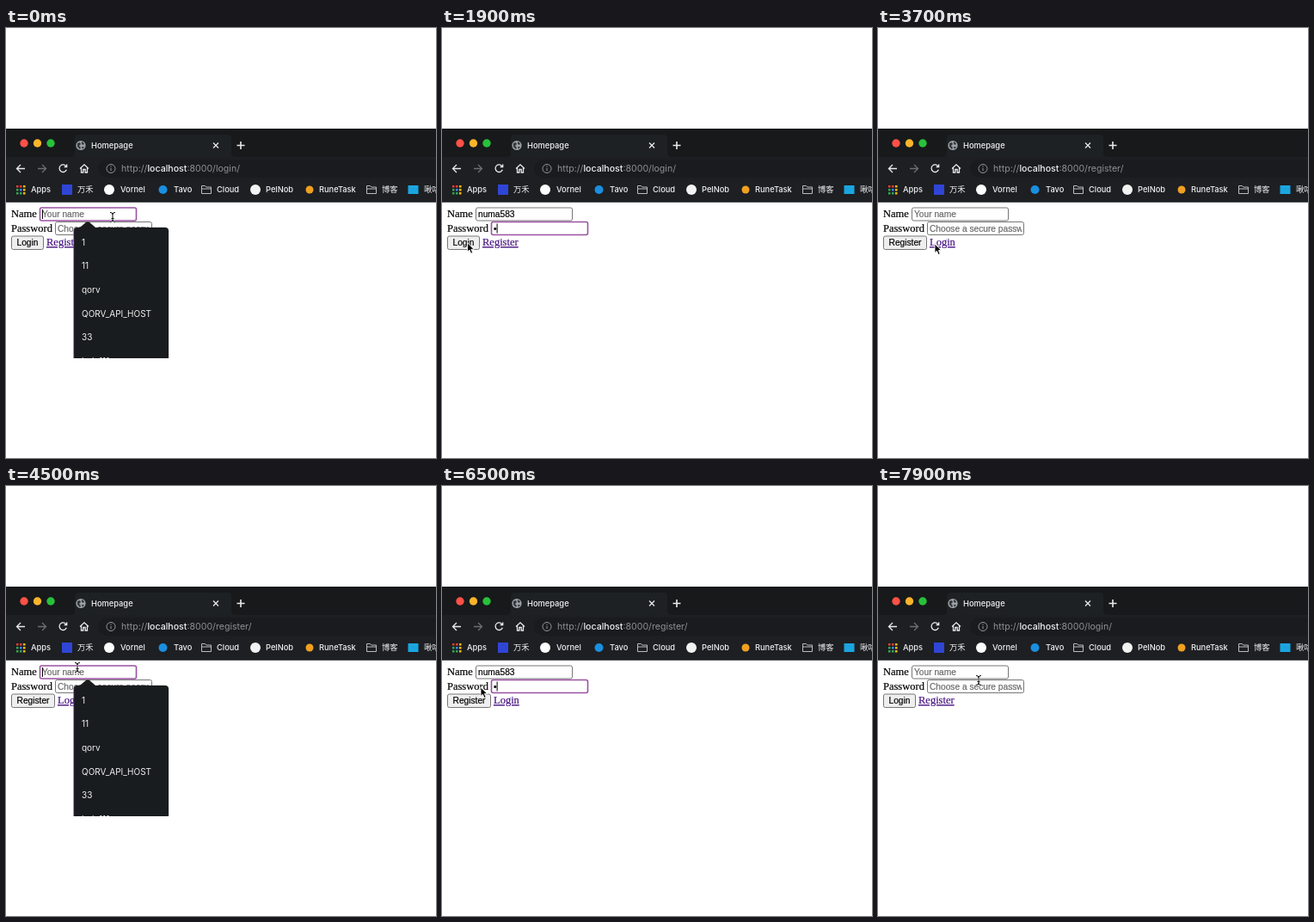
An HTML page that plays this animation: 500 px wide and 500 px high, repeating every 8 s.

```html
<!DOCTYPE html>
<html lang="en">
<head>
<meta charset="utf-8">
<title>Login form</title>
<style>
  html, body { margin: 0; width: 100%; height: 100%; overflow: hidden; background: #fff; }
  svg { display: block; }
  text { white-space: pre; }
  .ui { font: 500 9.3px Inter, "Noto Sans CJK SC", "Noto Sans CJK", sans-serif; fill: #f0f1f2; }
  .url { font: 400 10.6px Inter, sans-serif; fill: #8d9196; }
  .item { font: 400 10px Inter, sans-serif; fill: #f0f0f0; }
  .page { font: 12.5px "Liberation Serif", serif; stroke: #000; stroke-width: .2; }
  .link { fill: #451080; stroke: #451080; text-decoration: underline; }
  .field { font: 10.2px "Liberation Sans", sans-serif; stroke: currentColor; stroke-width: .2; }
  .line { fill: none; stroke: #e8eaec; stroke-width: 1.3; }
</style>
</head>
<body>
<svg id="stage" width="100%" height="100%" viewBox="0 0 500 500">
  <g id="chrome"></g>
  <g id="view"></g>
</svg>
<script>
const LOOP = 8000, STEP = 100, USER = 'numa583';

const text = (x, y, s, cls, extra = '') => `<text x="${x}" y="${y}" class="${cls}" ${extra}>${s}</text>`;
const rect = (x, y, w, h, fill, extra = '') =>
  `<rect x="${x}" y="${y}" width="${w}" height="${h}" fill="${fill}" ${extra}/>`;
const dot = (x, y, r, fill) => `<circle cx="${x}" cy="${y}" r="${r}" fill="${fill}"/>`;
const line = (d, extra = '') => `<path class="line" d="${d}" ${extra}/>`;
const folder = x => line(`M${x - 5.5} 183.5h4l1.3 1.5h5.7v7.5h-11zM${x - 5.5} 187h11`, 'style="stroke:#b9bdc2;stroke-width:1"');

function drawChrome() {
  const lights = ['#ff5147', '#fdb42a', '#28c13a'].map((c, i) => dot(21 + 15.5 * i, 134, 4.7, c));
  const appColors = ['#ea4335', '#ea4335', '#fbbc05', '#34a853', '#4285f4', '#fbbc05', '#34a853', '#34a853', '#fbbc05'];
  const apps = appColors.map((c, i) => rect(12 + i % 3 * 4, 183 + Math.floor(i / 3) * 4, 2.5, 2.5, c));
  const labels = [[29, 'Apps'], [83, '万禾'], [133, 'Vornel'], [195, 'Tavo'], [245, 'Cloud'],
    [302, 'PelNob'], [364, 'RuneTask'], [437, '博客'], [486, '啾咕']];
  return [
    rect(0, 117, 500, 85.5, '#17191b'),
    rect(0, 150, 500, 52.5, '#1d1f22'),
    '<path d="M75 150q5 0 5-5v-16q0-5 5-5h172q5 0 5 5v16q0 5 5 5z" fill="#1e2124"/>',
    rect(107, 153, 400, 21, '#191b1e', 'rx="10.5"'),
    ...lights,
    dot(87, 136.5, 5.6, '#9ba1a6'),
    '<path d="M83 134l3-1 1 2-2 2 2 2-1 2-3-3zM88 132l3 2-1 2-2-1zM88 138l3 0-2 3z" fill="#34383c"/>',
    text(99, 139.8, 'Homepage', 'ui'),
    line('M241 133.5l6 6m0-6l-6 6'),
    line('M268.5 136.5h9m-4.5-4.5v9', 'style="stroke-width:1.6"'),
    line('M22 163.5h-9.5m4.5-4.5l-4.5 4.5 4.5 4.5'),
    line('M70 160.8a4.3 4.3 0 1 0 .4 4M70.7 158.5v3h-3'),
    line('M86 163.5l5-4.7 5 4.7M87.5 162.5v5.5h2.3v-3.5h2.4v3.5h2.3v-5.5'),
    line('M127 163.5a5 5 0 1 1-10 0a5 5 0 1 1 10 0M122 162.8v3.4M122 160.4v1.2', 'style="stroke:#94989d;stroke-width:1"'),
    ...apps,
    rect(65, 182, 12, 12, '#2f45d6'),
    dot(120, 188, 6, '#fff'),
    dot(182.5, 188, 5, '#1a8fe0'),
    folder(233),
    dot(290, 188, 6, '#f2f2f2'),
    dot(353, 188, 4.5, '#f0a020'),
    folder(425),
    rect(467.5, 183, 12, 10, '#1ba5e0'),
    ...labels.map(([x, s]) => text(x, 191.3, s, 'ui'))
  ].join('');
}

function input(x, y, value, hint, focused, caret) {
  const shown = value || hint;
  const color = value ? '#000' : '#686868';
  const ring = focused ? 'stroke="#9a52a2" stroke-width="1.6"' : 'stroke="#767676"';
  const caretX = x + 3 + (value === '•' ? 3.6 : value.length * 6.05);
  return rect(x + .5, y + .5, 112, 15, '#fff', `rx="2" ${ring}`) +
    `<svg x="${x + 3}" y="${y}" width="107" height="16">` +
    text(0, 11.6, shown, 'field', `fill="${color}" color="${color}"`) + '</svg>' +
    (focused && caret ? rect(caretX, y + 2.5, 1, 11, '#000') : '');
}

function dropdown() {
  const items = ['1', '11', 'qorv', 'QORV_API_HOST', '33', 'belo111'];
  return '<svg y="220" width="500" height="164" viewBox="0 220 500 164">' +
    '<path d="M83 232h3l7-6q2-1 4 0l7 6h81q4 0 4 4v160H79V236q0-4 4-4z" fill="#191c1e" stroke="#000" stroke-opacity=".2"/>' +
    rect(78.5, 235, .7, 150, '#7b3a86') +
    items.map((s, i) => text(88, 252.8 + 27.6 * i, s, 'item')).join('') + '</svg>';
}

// Pointer runs: each is a shape followed by [time, x, y] points.
const runs = [
  ['beam', [0, 124, 220], [300, 124, 220]],
  ['arrow', [1500, 100, 236], [1800, 30, 250], [2200, 28, 249], [2700, 22, 171], [3000, 22, 171], [3300, 62, 244]],
  ['hand', [3300, 62, 246], [3400, 66, 251], [3700, 66, 251]],
  ['arrow', [3700, 66, 251], [4000, 80, 226]],
  ['beam', [4000, 80, 222], [4200, 83, 211], [4700, 83, 211]],
  ['beam', [5200, 83, 214], [5400, 74, 228], [5800, 74, 228]],
  ['arrow', [6200, 66, 230], [6500, 45, 234], [6800, 35, 250], [7200, 36, 258], [7500, 88, 306], [7800, 112, 244]],
  ['beam', [7800, 115, 234], [7900, 117, 226], [8000, 117, 226]]
];
const beam = 'M-3-5.5q3 0 3 2 0-2 3-2M0-4v8M-3 5.5q3 0 3-2 0 2 3 2M-1.5 1.5h3';
const shapes = {
  beam: `<path d="${beam}" fill="none" stroke="#fff" stroke-width="2.2"/><path d="${beam}" fill="none" stroke="#000"/>`,
  arrow: '<path d="M0 0v10.5l2.4-2.2 1.8 4.2 2-.9-1.8-4h3.3z" fill="#000" stroke="#fff" stroke-width=".9"/>',
  hand: '<path d="M-1 0q1.5-1 2 .5v4l4 1q2 .5 1.5 3l-1 4.5h-5l-4-5q0-2 2.5-.5z" fill="#000" stroke="#fff" stroke-width=".9"/>'
};

function pointer(t) {
  const run = runs.find(([, ...p]) => t >= p[0][0] && t < p[p.length - 1][0]);
  if (!run) return '';
  const [shape, ...pts] = run;
  const i = pts.findIndex(p => p[0] > t);
  const [a, b] = [pts[i - 1], pts[i]];
  const k = (t - a[0]) / (b[0] - a[0]);
  const at = n => a[n] + (b[n] - a[n]) * k;
  return `<g transform="translate(${at(1)} ${at(2)})">${shapes[shape]}</g>`;
}

const within = (t, a, b) => t >= a && t < b;
const typed = (t, start) => USER.slice(0, Math.max(0, Math.floor((t - start) / 100) + 1));

function drawView(t) {
  const register = within(t, 3500, 7000);
  const name = t < 3500 ? typed(t, 300) : register ? typed(t, 4600) : '';
  const pass = within(t, 1600, 2400) || within(t, 5800, 7000) ? '•' : '';
  const nameFocus = t < 1300 || within(t, 4200, 5400);
  const passFocus = within(t, 1300, 2100) || within(t, 5400, 6900);
  const list = t < 500 || within(t, 4300, 4800);
  const caret = (t + 500) % 1000 <= 500;
  const forward = within(t, 2500, 3500);
  const [action, other, width] = register ? ['Register', 'Login', 51] : ['Login', 'Register', 38];
  return [
    line('M37 163.5h9.5m-4.5-4.5l4.5 4.5-4.5 4.5', forward ? '' : 'style="stroke:#6b6f74"'),
    text(134, 167.3, `http://<tspan fill="#f1f3f4" font-weight="500">localhost</tspan>:8000/${action.toLowerCase()}/`, 'url'),
    text(6, 220, 'Name', 'page'),
    input(39, 208.5, name, 'Your name', nameFocus, caret),
    text(6, 236.7, 'Password', 'page'),
    input(57, 225, pass, 'Choose a secure password', passFocus, caret),
    rect(6.5, 242, width - 1, 15.5, '#efefef', 'rx="2" stroke="#767676"'),
    text(6 + width / 2, 253.2, action, 'field', 'text-anchor="middle"'),
    text(9 + width, 253.2, other, 'page link'),
    list ? dropdown() : '',
    pointer(t)
  ].join('');
}

const view = document.getElementById('view');
document.getElementById('chrome').innerHTML = drawChrome();
const start = performance.now();
let last = -1;
function tick() {
  const t = Math.floor((performance.now() - start) % LOOP / STEP) * STEP;
  if (t !== last) view.innerHTML = drawView(last = t);
  requestAnimationFrame(tick);
}
tick();
</script>
</body>
</html>
```
